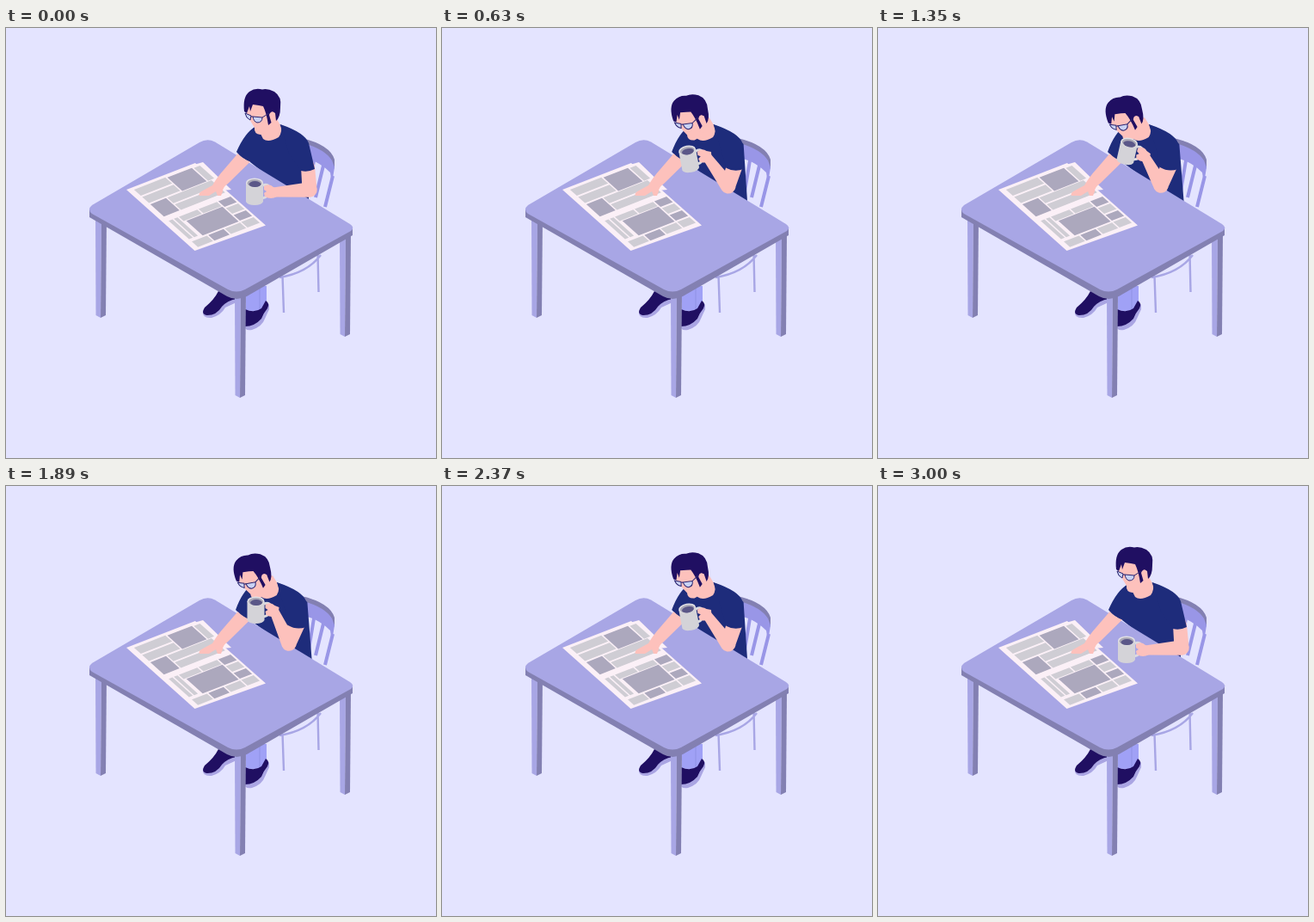
Write an HTML page that moves like this. It is 500x500 px and loops after 4560 ms.

```html
<!DOCTYPE html>
<html lang="en">
<head>
<meta charset="utf-8">
<title>Morning coffee</title>
<style>
  html, body { margin: 0; width: 100%; height: 100%; overflow: hidden; background: #e4e4ff; }
  svg { display: block; width: 100%; height: 100%; }
  .light { fill: #a8a6e5; }
  .dark { fill: #8380b2; }
  .chair { fill: #9996e7; }
  .rod { fill: none; stroke: #a8a6e5; stroke-width: 2.4; }
  .spindle { fill: none; stroke: #9996e7; stroke-width: 4; }
  .skin { fill: #fdc1bc; }
  .shirt { fill: #1e2c7b; }
  .ink { fill: #200f62; }
  .paper { fill: #fbf0f7; }
</style>
</head>
<body>
<svg viewBox="0 0 500 500">
  <!-- chair -->
  <path class="spindle" d="M358 154L352 190M369 160L360 197M380 172L371 208"/>
  <path class="dark" d="M344 128Q377 136 382 153V164L378 158Q370 144 346 135Z"/>
  <path class="chair" d="M346 134Q371 141 379 154L382 162 379 181 377 168Q365 156 350 152Z"/>
  <path class="rod" d="M321.500 288L323 331M362.500 262L363.500 307M318 290Q350 285 366 264"/>

  <!-- legs and shoes -->
  <path fill="#a0a1f6" d="M279 300H303V325Q292 331 279 328Z"/>
  <path fill="none" stroke="#8f91e4" d="M295 303V327"/>
  <path fill="#aaa5e3" d="M229 329Q228 338 239 337 250 334 255 325L268 319V312ZM277 344Q277 353 286 351 298 347 301 338L306 327V321Z"/>
  <path class="ink" d="M247 306Q242 316 231 325 226 333 234 334 245 334 251 324 257 317 268 315V309ZM278 327Q289 332 297 326L302 317Q307 320 304 326 299 332 297 338 289 347 278 347Z"/>

  <g id="torso">
    <path class="shirt" d="M291 114Q278 121 268 144 274 152 284 156L330 192 352 202V135Q337 119 318 112Z"/>
    <path class="skin" d="M291 113L299 129Q305 134 317 127 322 120 319 113L314 104Z"/>
  </g>

  <!-- table -->
  <g id="legs"></g>
  <path class="dark" d="M97 211V220L257 312Q268 318 280 312L403 241V232Z"/>
  <path class="light" d="M100 206L225 133Q234 128 243 132.500L400 228Q406 232 401 236L278 304Q268 309 258 304L100 216Q94 211 100 206Z"/>

  <!-- newspaper -->
  <path class="paper" d="M215 160L229 156 262 188 240 190Z"/>
  <path class="paper" d="M140 188L220 157 302 229.500 219.500 259Z"/>
  <g id="news" transform="matrix(.79 -.31 .79 .71 141 188)"></g>

  <!-- resting arm -->
  <path class="skin" d="M269.500 146Q275 152 284 155.500L258 181Q252 185 252 190L250 195 246 195 244 190 236 195 225 195Q223 192 229 189L240 183Q245 174 254 164Z"/>

  <g id="head">
    <path class="skin" d="M279 88L280 101 286 111 289 116Q288 123 296 124 307 122 315 108L317 90Z"/>
    <path class="ink" d="M277 97Q275 80 283 74 290 69 298 71.500 304 70 312 74 321 80 319 92 319 104 314 108L313 99Q308 95 306 101L308.500 110 305 113Q303 99 299 91L294 90 287 89 284 97 283 91 280 99Z"/>
    <ellipse class="skin" cx="310" cy="102" rx="2.600" ry="4.500"/>
    <path fill="#c9d2f4" stroke="#2a2470" d="M278 99L285 102 284 107Q279 105 278 99ZM287 103L298 104Q298 110 292 110 288 109 287 103Z"/>
    <path fill="none" stroke="#2a2470" d="M285 103H287M298 104L306 99"/>
  </g>

  <g id="mug">
    <path fill="none" stroke="#dcdbe0" stroke-width="3" d="M9 -7Q18 -10 17 -1 16 7 9 8"/>
    <path fill="#d4d3d8" d="M-10 -10V12Q-8 16 0 16 8 16 10 12V-10Z"/>
    <ellipse fill="#e2e1e5" cy="-10" rx="10" ry="5.500"/>
    <ellipse fill="#aaa8b6" cy="-9.500" rx="8.500" ry="4.500"/>
    <ellipse fill="#5b5788" cx=".5" cy="-8.400" rx="7" ry="3.500"/>
  </g>
  <path class="skin" id="arm"/>
  <path class="skin" id="hand" d="M11 -6Q17 -10 22 -5L27 -3 26 6Q19 10 12 6L11 2 14 0 11 -2Z"/>
  <path class="shirt" id="sleeve"/>
</svg>

<script>
const $ = id => document.getElementById(id);
const LOOP = 4560, STEP = 30, SIPPED = 1350, RETURNED = 3000;

const tableLeg = (x, top, end) => `
  <path class="light" d="M${x} ${top}H${x + 7}L${x + 6} ${end + 3} ${x + .5} ${end}Z"/>
  <path class="dark" d="M${x + 7} ${top}H${x + 13}L${x + 12} ${end} ${x + 6} ${end + 3}Z"/>`;
$('legs').innerHTML = tableLeg(104, 220, 334) + tableLeg(266, 308, 427) + tableLeg(388, 240, 356);

// Fills a page area (in percent) with equal articles: "t" is text, "p" a picture.
function articles(kinds, x, y, w, h, across) {
  const gap = 2, n = kinds.length;
  const cellW = across ? (w - gap * (n - 1)) / n : w;
  const cellH = across ? h : (h - gap * (n - 1)) / n;
  return [...kinds].map((kind, i) => `<rect width="${cellW}" height="${cellH}"
    x="${x + (across ? i * (cellW + gap) : 0)}" y="${y + (across ? 0 : i * (cellH + gap))}"
    fill="${kind === 'p' ? '#aca8bd' : '#cfcdd4'}"/>`).join('');
}
$('news').innerHTML =
  articles('tt', 7, 3, 46, 22) +
  articles('p', 55, 4, 36, 22) +
  articles('t', 93, 5, 9, 21) +
  articles('p', 7, 27, 23, 20) +
  articles('tt', 32, 27, 65, 20) +
  articles('tt', 7, 54, 13, 30, true) +
  articles('tt', 22, 54, 56, 7, true) +
  articles('p', 25, 62, 53, 24) +
  articles('ptpt', 80, 54, 18, 43) +
  articles('tpt', 7, 88, 71, 9, true);

const mix = (a, b, k) => a + (b - a) * k;
const ease = (t, from, to) => {
  const k = Math.min(1, Math.max(0, (t - from) / (to - from)));
  return (1 - Math.cos(Math.PI * k)) / 2;
};

// Tapered limb with round ends.
function limb(x1, y1, r1, x2, y2, r2) {
  const d = Math.hypot(x2 - x1, y2 - y1), nx = (y1 - y2) / d, ny = (x2 - x1) / d;
  const at = (x, y, r) => `${x + nx * r} ${y + ny * r}`;
  return `M${at(x1, y1, -r1)}L${at(x2, y2, -r2)}A${r2} ${r2} 0 0 1 ${at(x2, y2, r2)}` +
    `L${at(x1, y1, r1)}A${r1} ${r1} 0 0 1 ${at(x1, y1, -r1)}Z`;
}

function draw(time) {
  // The way back is the way up in reverse.
  const t = Math.min(time, Math.max(0, RETURNED - time), SIPPED);
  const lift = ease(t, 0, 850), sip = ease(t, 870, SIPPED);
  const move = (id, value) => $(id).setAttribute('transform', value);
  const shape = (id, path) => $(id).setAttribute('d', path);

  // The body leans from the table edge; the head nods further.
  move('torso', `translate(0 156) skewX(${4.5 * lift}) translate(0 -156)`);
  move('head', `translate(${-3 * lift} ${4.5 * lift}) rotate(${-15 * lift} 308 125)`);

  const x = mix(289, 291, lift) - 28 * lift * (1 - lift) - sip;
  const y = mix(190, 145, lift) - 2 * sip;
  const tilt = -13 * lift + 26 * sip;
  const held = `translate(${x} ${y}) rotate(${tilt})`;
  move('mug', held);
  move('hand', held);

  const angle = tilt * Math.PI / 180;
  const wristX = x + 22 * Math.cos(angle);
  const wristY = y + 22 * Math.sin(angle) + mix(1, 3, lift);
  const elbowX = mix(353, 329, lift), elbowY = mix(188, 183, lift);
  const hemX = mix(351, 338, lift), hemY = 166;
  shape('arm', limb(hemX, hemY - 5, mix(8, 9.5, lift), elbowX, elbowY, 8.5) +
    limb(elbowX, elbowY, 8.8, wristX, wristY, 5.5));

  const collar = 319 - 4 * lift, outer = 352 - 3 * lift;
  shape('sleeve', `M${collar} 112Q${outer - 4} 122 ${outer} 134
    L${hemX + mix(8, 11, lift)} ${hemY - 2}Q${hemX} ${hemY + 2} ${hemX - mix(8, 10, lift)} ${hemY - 4 * lift}
    L${collar + 10} 146Z`);
}

function frame(now) {
  draw(Math.floor(now % LOOP / STEP) * STEP);
  requestAnimationFrame(frame);
}
draw(0);
requestAnimationFrame(frame);
</script>
</body>
</html>
```
